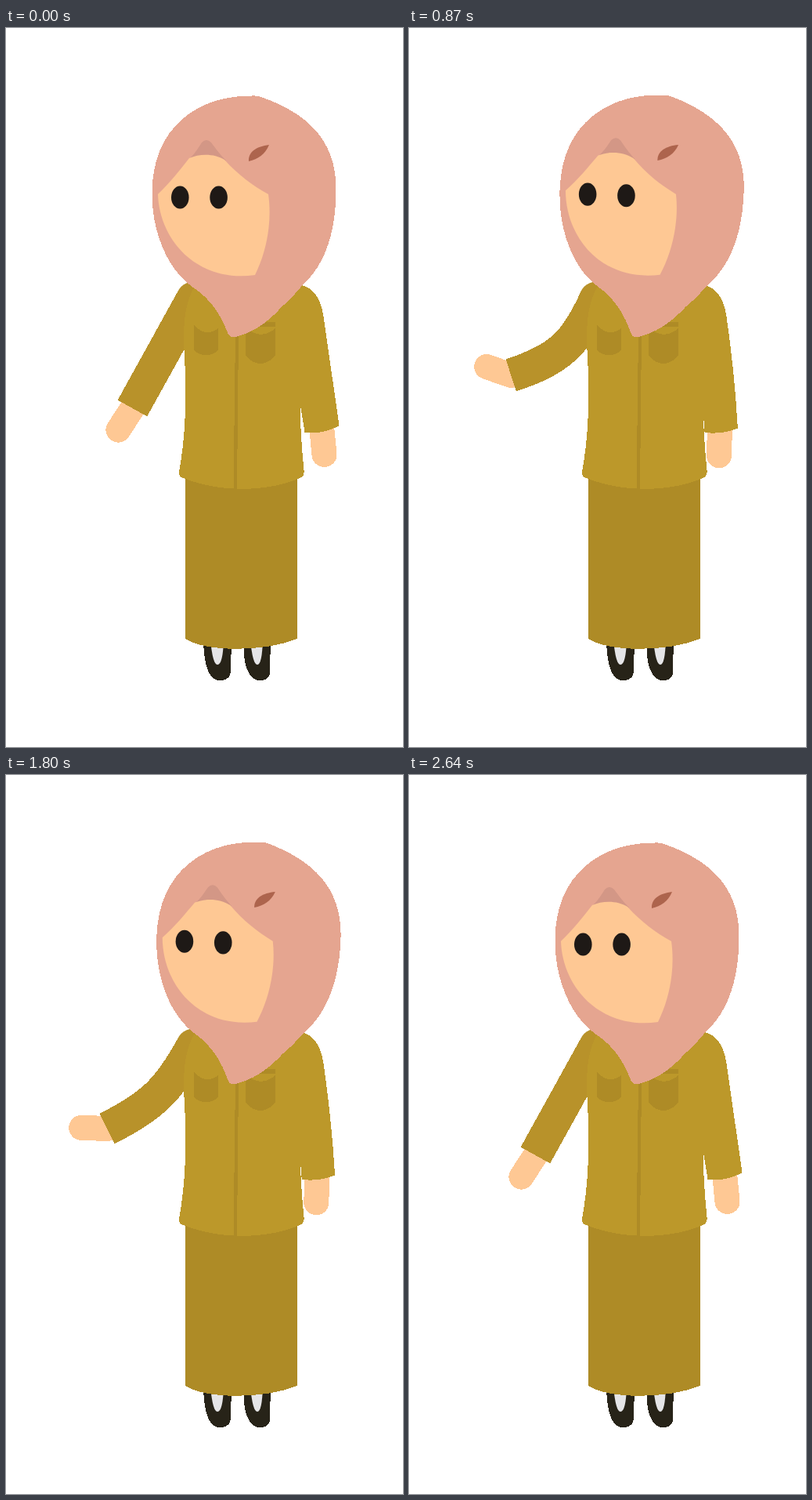
These frames come from a looping animation (507 by 917 pixels, 2.7 s). An HTML page:

```html
<!DOCTYPE html>
<html lang="en">
<head>
<meta charset="utf-8">
<title>Gesturing woman</title>
<style>
  html, body { margin: 0; width: 100%; height: 100%; overflow: hidden; background: #fff; }
  svg { display: block; width: 100vw; height: 100vh; }
  .shirt, .dark, .veil, .shoe, .far, .hand { shape-rendering: crispEdges; }
  .skin { fill: #fec894; }
  .hand { fill: none; stroke: #fec894; stroke-width: 32; stroke-linecap: round; }
  .shirt { fill: #bc982a; stroke: #bc982a; }
  .far { fill: none; stroke: #b8922a; stroke-width: 43; }
  .dark { fill: #ae8b26; }
  .veil { fill: #e5a590; stroke: #e5a590; }
  .shoe { fill: #272318; }
  .sock { fill: #e5e5e7; }
  .eye { fill: #1e1916; }
</style>
</head>
<body>
<svg viewBox="0 0 507 917">
  <!-- feet -->
  <path class="shoe" d="M252 780 Q253 832 273 832 Q287 832 287 819 L288 780Z"/>
  <path class="sock" d="M261 780 H278 Q277 812 270 812 Q264 812 261 780Z"/>
  <path class="shoe" d="M303 780 L304 801 Q308 832 324 832 Q338 832 337 819 L338 780Z"/>
  <path class="sock" d="M312 780 H328 Q327 812 321 812 Q315 812 312 780Z"/>

  <path class="dark" d="M229 560 H372 V779 C330 796 255 796 229 779Z"/>

  <path class="hand" id="farHand"/>
  <circle fill="#b8922a" cx="239" cy="345" r="21.5"/>
  <path class="far" id="farSleeve"/>

  <!-- jacket -->
  <path class="shirt" d="M248 322 C230 340 226 375 228 411 C232 470 229 525 221.500 566 Q221 571 225 573
    C272 592 333 592 376 573 Q381 571 380 564 Q375 515 375 470 L372 326Z"/>
  <path class="dark" d="M293 388 H297 L295 587.500 H290.500Z"/>
  <path class="dark" d="M240 379 Q255 395 271 383 V411 Q256 424 240 411Z"/>
  <path class="dark" d="M306 382 Q325 399 344 383 V418 Q325 438 306 418Z"/>
  <path class="dark" d="M315 375 H344 V381 H315Z"/>

  <path class="hand" id="nearHand"/>
  <path class="shirt" id="nearSleeve"/>

  <!-- head -->
  <path class="veil" data-bend="M318,87 C245,86 188,126 187,210 C187,262 207,308 240,331 C263,346 276,369 283,387
    Q285,394 291,394 C318,388 338,371 352,355 C362,347 372,335 378,328 C408,301 421,258 421,205
    C421,140 380,107 324,88 Q321,87 318,87Z"/>
  <path fill="#d39786" data-bend="M234,167 C241,161 246,152 250,146 Q256,140 262,146 C268,154 273,161 281,169 L257,172Z"/>
  <path class="skin" data-bend="M194,212 C210,197 222,181 234,166 C248,160 266,160 279,168 C296,187 315,201 335,212
    C340,247 333,285 318,315 C243,325 196,270 194,212Z"/>
  <path fill="#ad644d" data-bend="M310,170 C309,158 320,151 336,149 C331,161 322,167 310,170Z"/>
  <ellipse class="eye" data-x="222.300"/>
  <ellipse class="eye" data-x="271.600"/>
</svg>
<script>
const LOOP = 2700, SPAN = 2640, STEP = 30;
const SHOULDER = [239, 345], BONE = 80, PALM = 33;

const $ = id => document.getElementById(id);
const mix = (a, b, p) => a + (b - a) * p;

// far arm in degrees: how far it is lifted, and how much each joint curls
const gesture = [
  { t: 0,    lift: 29, curl: 0 },
  { t: 480,  lift: 42, curl: 22 },
  { t: 1000, lift: 50, curl: 24.5 },
  { t: 1800, lift: 46, curl: 17.5 },
  { t: 2160, lift: 58, curl: 12 },
  { t: 2340, lift: 47, curl: 18.5 },
  { t: SPAN, lift: 29, curl: 0 }
];

function gestureAt(t) {
  const i = gesture.findIndex(k => k.t > t), a = gesture[i - 1], b = gesture[i];
  const p = (t - a.t) / (b.t - a.t);
  return [mix(a.lift, b.lift, p), mix(a.curl, b.curl, p)];
}

// point at a distance, turned clockwise from straight down
function reach([x, y], length, degrees) {
  const a = degrees * Math.PI / 180;
  return [x - length * Math.sin(a), y + length * Math.cos(a)];
}

function drawFarArm(t) {
  const [lift, curl] = gestureAt(t);
  const elbow = reach(SHOULDER, BONE, lift - curl);
  const wrist = reach(elbow, BONE, lift + curl);
  const palm = reach(wrist, PALM, lift + 2.4 * curl + 4);
  const toElbow = from => from.map((v, i) => mix(v, elbow[i], 0.8));
  $('farHand').setAttribute('d', `M${wrist} L${palm}`);
  $('farSleeve').setAttribute('d', `M${SHOULDER} C${toElbow(SHOULDER)} ${toElbow(wrist)} ${wrist}`);
}

function drawNearArm(p) {
  const m = (a, b) => mix(a, b, p);
  $('nearHand').setAttribute('d', `M${m(403, 394)} 508 L${m(406.5, 390.5)} ${m(544, 546)}`);
  $('nearSleeve').setAttribute('d',
    `M366 327 C390 327 401 342 405 368 Q415 ${m(438, 435)} ${m(425, 416.5)} ${m(507, 512)}
     Q${m(404, 398)} 518 ${m(382, 376)} 515.5 L375 472 L350 400Z`);
}

// the head leans over the chin, which stays in place
function bend(x, y, p) {
  const a = 0.051 * p, up = Math.min(1, Math.max(0, (390 - y) / 170));
  return [x + a * (390 - y), y + a * (x - 338) * up];
}

const bent = [...document.querySelectorAll('[data-bend]')];
const eyes = [...document.querySelectorAll('.eye')];

function drawHead(p, open) {
  for (const el of bent)
    el.setAttribute('d', el.dataset.bend.replace(/(\d+),(\d+)/g, (_, x, y) => bend(+x, +y, p).join(' ')));
  for (const el of eyes) {
    const [x, y] = bend(+el.dataset.x, 216, p);
    el.setAttribute('cx', x);
    el.setAttribute('cy', y);
    el.setAttribute('rx', 11.3 * open);
    el.setAttribute('ry', 14.6 * open);
  }
}

function draw(now) {
  const t = Math.min(Math.floor(now % LOOP / STEP) * STEP, SPAN) % SPAN;
  const lean = 1 - Math.abs(t / (SPAN / 2) - 1);
  const open = 1 - 0.5 * Math.max(0, 1 - Math.abs(t - 2370) / 90);
  drawFarArm(t);
  drawNearArm(lean);
  drawHead(lean, open);
}

function tick(now) {
  draw(now);
  requestAnimationFrame(tick);
}
draw(0);
requestAnimationFrame(tick);
</script>
</body>
</html>
```
